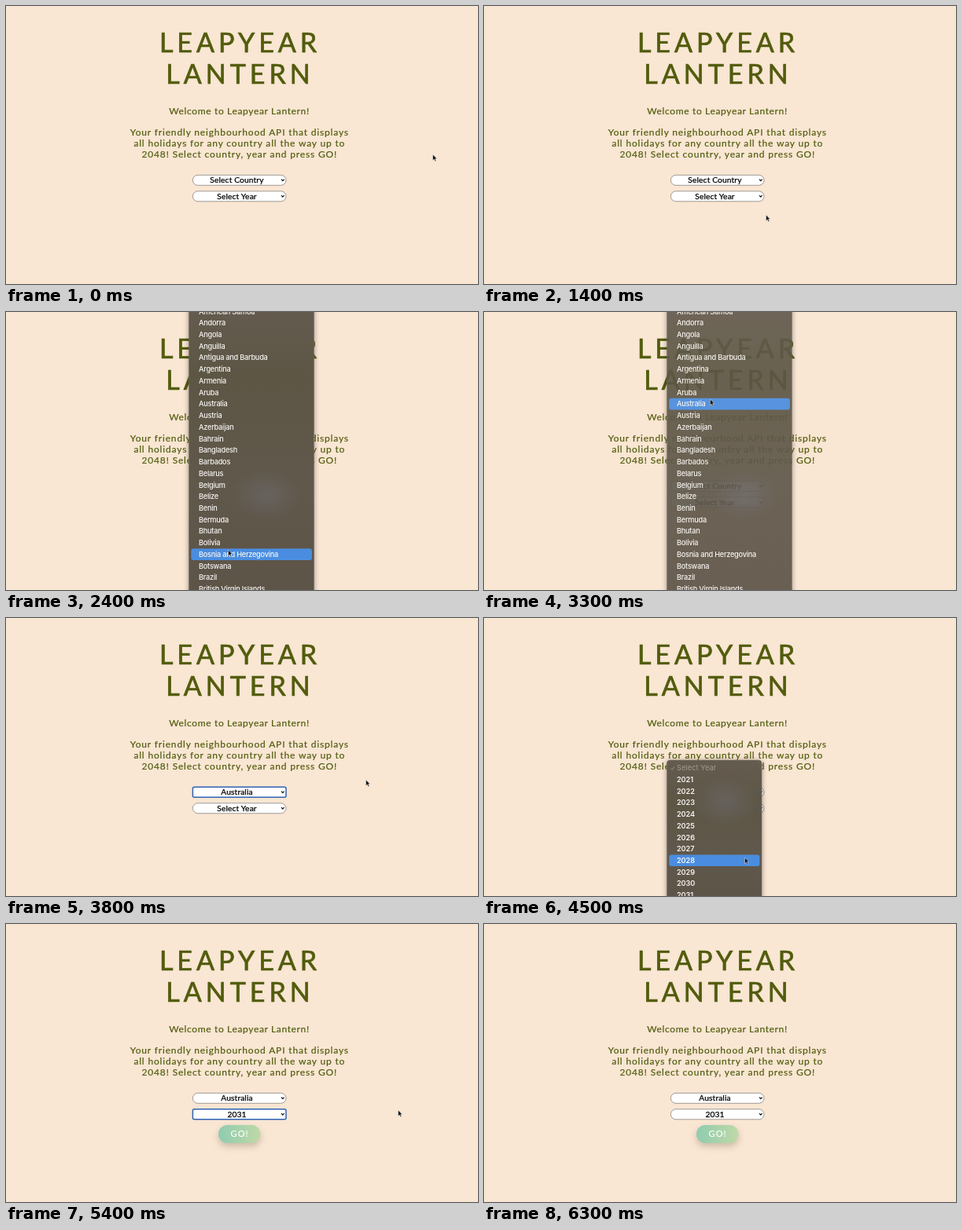
Recreate the animation shown at these times as an HTML page. Size 600 by 354 pixels, loop 6900 ms.

```html
<!DOCTYPE html>
<html lang="en">
<head>
<meta charset="utf-8">
<title>Leapyear Lantern</title>
<style>
  html, body { margin: 0; width: 100%; height: 100%; overflow: hidden; background: #f9e6d3; }
  svg { display: block; width: 600px; height: 354px; }
  .page { font-family: Lato, sans-serif; font-weight: 400; text-anchor: middle; fill: #525c0d; stroke: #525c0d; }
  .title { font-size: 34px; letter-spacing: 5px; stroke-width: .7px; }
  .intro { font-size: 12px; letter-spacing: .84px; stroke-width: .2px; }
  .welcome { letter-spacing: .65px; }
  .pill { fill: #fff; stroke: #77736f; stroke-width: .7px; }
  .focused .pill { stroke: #2f62b4; stroke-width: 1.5px; rx: 2px; }
  .label { font: 400 10.2px Lato, sans-serif; letter-spacing: .15px; text-anchor: middle; fill: #000; stroke: #000; stroke-width: .25px; }
  .arrow { fill: none; stroke: #111; stroke-width: 1.2px; }
  .go { filter: drop-shadow(0 4px 4px rgba(90, 70, 50, .28)); }
  .go text { font: 400 11px Lato, sans-serif; letter-spacing: 1px; text-anchor: middle; fill: #fff; stroke: #fff; stroke-width: .15px; }
  .menu { filter: drop-shadow(0 1px 3px rgba(0, 0, 0, .4)); font: 500 9.2px Inter, sans-serif; letter-spacing: -.25px; fill: #f7f5f2; }
  .years { font-weight: 600; letter-spacing: -.1px; }
  .years .hint { fill: #a09a8e; font-weight: 400; letter-spacing: .1px; }
</style>
</head>
<body>
<svg viewBox="0 0 600 354">
  <defs>
    <linearGradient id="mint"><stop stop-color="#8fccb0"/><stop offset="1" stop-color="#bfd9a6"/></linearGradient>
    <linearGradient id="shade" x2="0" y2="1">
      <stop stop-color="#655c50"/><stop offset=".25" stop-color="#5d5645"/>
      <stop offset=".6" stop-color="#60584b"/><stop offset="1" stop-color="#5d5348"/>
    </linearGradient>
    <radialGradient id="haze"><stop stop-color="#706d74" stop-opacity=".5"/><stop offset="1" stop-color="#706d74" stop-opacity="0"/></radialGradient>
  </defs>
  <rect width="600" height="354" fill="#f9e6d3"/>
  <g class="page">
    <g class="title"><text x="297.5" y="59.4">LEAPYEAR</text><text x="297.5" y="98.6">LANTERN</text></g>
    <g class="intro">
      <text class="welcome" x="296.5" y="138.3">Welcome to Leapyear Lantern!</text>
      <text x="296.8" y="164.6">Your friendly neighbourhood API that displays</text>
      <text x="296.8" y="178.9">all holidays for any country all the way up to</text>
      <text x="296.8" y="193.2">2048! Select country, year and press GO!</text>
    </g>
  </g>
  <g id="controls"></g>
  <g id="go" class="go">
    <rect x="270" y="256" width="53.5" height="23" rx="11.5" fill="url(#mint)"/>
    <text x="297" y="271.4">GO!</text>
  </g>
  <g id="menus"></g>
  <path id="cursor" d="M-1.5 -1v7.7l1.8 -1.6l1.2 2.7l1.2 -.5l-1.1 -2.7h2.2Z" fill="#111" stroke="#fff" stroke-width=".45"/>
</svg>
<script>
const LOOP = 6900, STEP = 100, PITCH = 14.73;
const $ = id => document.getElementById(id);

function add(parent, tag, attrs, text) {
  const node = document.createElementNS('http://www.w3.org/2000/svg', tag);
  for (const key in attrs) node.setAttribute(key, attrs[key]);
  if (text) node.textContent = text;
  return parent.appendChild(node);
}

function makeSelect(y) {
  const group = add($('controls'), 'g', {});
  add(group, 'rect', { class: 'pill', x: 237.4, y, width: 118.6, height: 13, rx: 6.5 });
  add(group, 'path', { class: 'arrow', d: `M350 ${y + 5.4}l1.8 2l1.8 -2` });
  const label = add(group, 'text', { class: 'label', x: 293.5, y: y + 10.1 });
  return { group, label };
}

function makeMenu(kind, top, width, firstRow, items) {
  const group = add($('menus'), 'g', { class: 'menu ' + kind });
  const height = 380 - top;
  add(group, 'rect', { x: 232.5, y: top, width, height, rx: 4, fill: 'url(#shade)', stroke: '#80776a', 'stroke-width': .5 });
  add(group, 'ellipse', { cx: 232.5 + width * .62, cy: 233, rx: 44, ry: 32, fill: 'url(#haze)' });
  const bar = add(group, 'rect', { x: 235.3, width: width - 5.4, height: 14.6, rx: 3, fill: '#4a8de0' });
  items.forEach((name, i) => add(group, 'text', { x: 245, y: firstRow + i * PITCH + 3.3 }, name));
  return { group, bar, firstRow };
}

const countries = ['American Samoa', 'Andorra', 'Angola', 'Anguilla', 'Antigua and Barbuda',
  'Argentina', 'Armenia', 'Aruba', 'Australia', 'Austria', 'Azerbaijan', 'Bahrain', 'Bangladesh',
  'Barbados', 'Belarus', 'Belgium', 'Belize', 'Benin', 'Bermuda', 'Bhutan', 'Bolivia',
  'Bosnia and Herzegovina', 'Botswana', 'Brazil', 'British Virgin Islands'];
const years = Array.from({ length: 11 }, (_, i) => String(2021 + i));

const countrySelect = makeSelect(215.3), yearSelect = makeSelect(235.8);
const countryMenu = makeMenu('countries', -20, 159, 14 - PITCH, countries);
const yearMenu = makeMenu('years', 181, 120.5, 205.6, years);
add(yearMenu.group, 'text', { class: 'hint', x: 245, y: 194.2 }, 'Select Year');
add(yearMenu.group, 'path', { d: 'M238 191.5l1.4 1.8l2.6 -4', fill: 'none', stroke: '#a09a8e', 'stroke-width': .8 });

// Pointer path: time, x, y
const path = [
  [0, 544, 190], [200, 470, 222], [400, 300, 232], [700, 107, 165], [800, 105, 150],
  [1000, 150, 235], [1200, 260, 297], [1400, 360, 267], [1500, 381, 262], [1800, 306, 219],
  [2100, 306, 222], [2400, 284, 304], [2500, 284, 316], [2700, 285, 275], [3000, 286, 175],
  [3300, 289, 112], [3400, 289, 112], [3700, 516, 190], [4000, 345, 241], [4100, 345, 241],
  [4500, 333, 306], [4700, 332, 345], [4900, 332, 348], [5200, 455, 160], [5400, 500, 238],
  [5600, 430, 238], [5900, 300, 267], [6000, 300, 267], [6100, 310, 278], [LOOP, 310, 278]
];

function pointerAt(t) {
  const i = path.findIndex(p => p[0] > t);
  const [t0, x0, y0] = path[i - 1], [t1, x1, y1] = path[i];
  const k = (t - t0) / (t1 - t0);
  return [x0 + (x1 - x0) * k, y0 + (y1 - y0) * k];
}

const show = (node, on) => { node.style.display = on ? '' : 'none'; };

function updateMenu(menu, open, y) {
  show(menu.group, open);
  const row = Math.max(0, Math.round((y - menu.firstRow) / PITCH));
  menu.bar.setAttribute('y', menu.firstRow + row * PITCH - 7.3);
}

function updateSelect(select, text, focused) {
  select.label.textContent = text;
  select.group.setAttribute('class', focused ? 'focused' : '');
}

function render(t) {
  const [x, y] = pointerAt(t);
  const within = (from, to) => t >= from && t < to;
  $('cursor').setAttribute('transform', `translate(${x} ${y})`);
  show($('cursor'), t < 6300);
  updateMenu(countryMenu, within(2000, 3400), y);
  countryMenu.group.style.opacity = t >= 3300 ? .92 : 1;
  updateMenu(yearMenu, within(4100, 4900), y);
  updateSelect(countrySelect, t < 3400 ? 'Select Country' : 'Australia', within(3400, 4100));
  updateSelect(yearSelect, t < 4900 ? 'Select Year' : '2031', within(4900, 6000));
  show($('go'), t >= 4900);
}

const start = performance.now();
function tick() {
  const t = (performance.now() - start) % LOOP;
  render(Math.floor(t / STEP) * STEP);
  requestAnimationFrame(tick);
}
tick();
</script>
</body>
</html>
```
